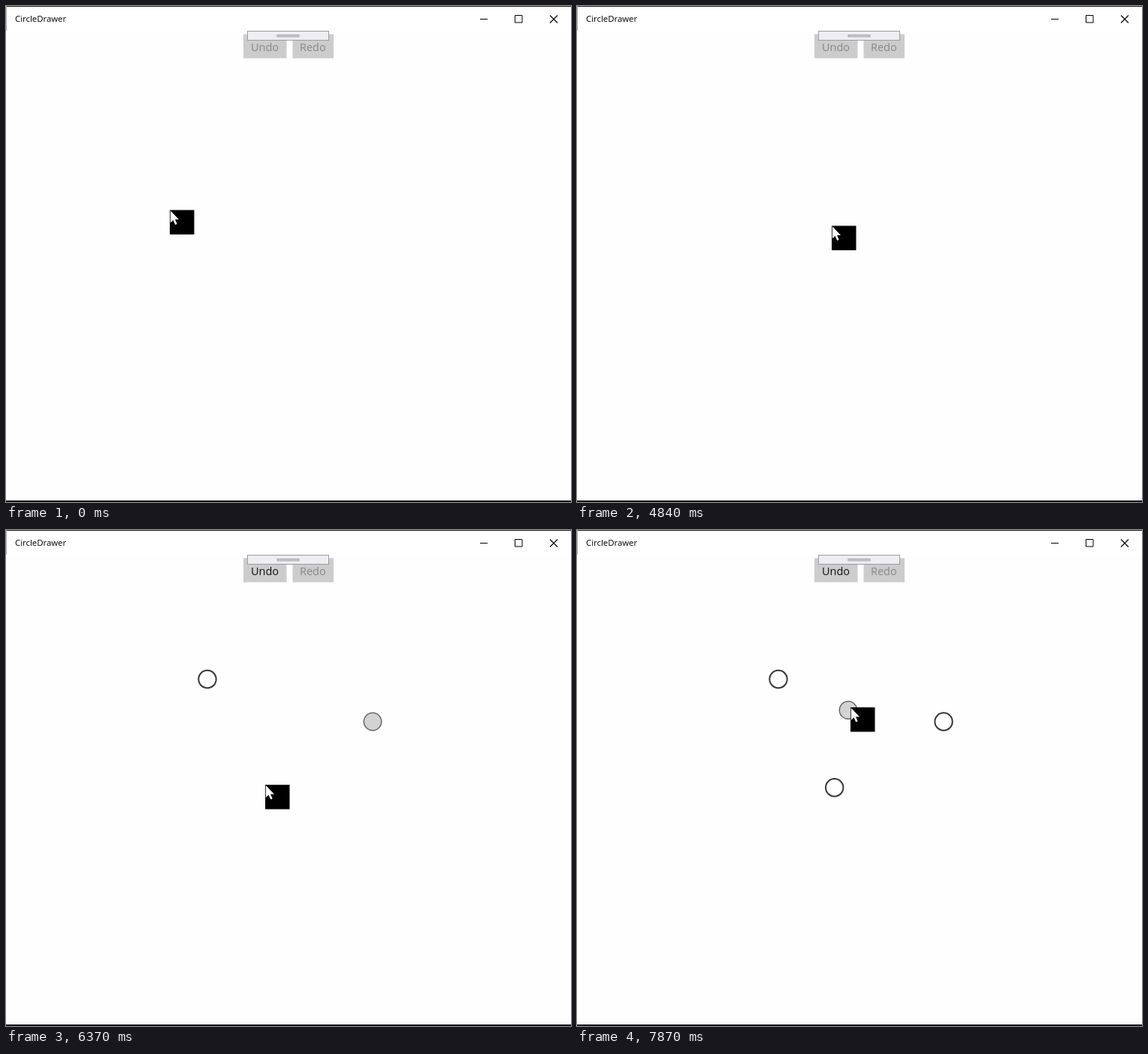
Animation, 752 px wide and 660 px high, one loop 8000 ms. Source, as an HTML page:

```html
<!DOCTYPE html>
<html lang="en">
<head>
<meta charset="utf-8">
<title>CircleDrawer</title>
<style>
  html, body { margin: 0; width: 100%; height: 100%; overflow: hidden; background: #fefefe; }
  svg { display: block; }
  text { font-family: "Open Sans", "Noto Sans", sans-serif; font-size: 14.5px; fill: #888; }
  #title { font-size: 11.4px; fill: #000; }
  #undo.on { fill: #111; }
  circle { fill: #fff; stroke: #383838; stroke-width: 2; }
  circle.active { fill: #d3d3d3; stroke: #666; stroke-width: 1.5; }
</style>
</head>
<body>
<svg width="752" height="660" viewBox="0 0 752 660">
  <rect width="752" height="33" fill="#fff"/>
  <rect width="752" height="1" fill="#1c1c1c"/>
  <rect width="1" height="33" fill="#aaa"/>
  <rect y="658" width="752" height="2"/>
  <text id="title" x="12" y="21">CircleDrawer</text>
  <g fill="none" stroke="#000">
    <path d="M631 17.5h10M677.5 12.5h9.5v9.5h-9.5z"/>
    <path d="M724 12.5l10 10M734 12.5l-10 10" stroke-width="1.1"/>
  </g>
  <path d="M316 37.5h57.5v32H316zM381.5 37.5H436v32h-54.5z" fill="#ccc"/>
  <text id="undo" x="326" y="60">Undo</text>
  <text x="391" y="60">Redo</text>
  <rect x="321.5" y="33.5" width="108" height="12" fill="#eeeef2" stroke="#999ca3"/>
  <rect x="361" y="38.5" width="29" height="2.5" fill="#ccced4" stroke="#a4a6ab"/>
  <g id="circles"></g>
  <g id="cursor">
    <rect width="32.5" height="32.5"/>
    <path d="M.8 .8v16.2l3.7-3.5 2.7 6 2.5-1.1-2.7-5.8h5z" fill="#fff"/>
  </g>
</svg>
<script>
const LOOP = 8000, STEP = 100 / 3;
const HIDE = 3770, SHOW = 4600;

// [time, x, y] of the pointer
const path = [
  [0, 218, 271.5], [HIDE, 218, 271.5],
  [SHOW, 552, 456], [4700, 458, 358], [4840, 339, 292.5], [4940, 289, 233], [5040, 267, 198],
  [5540, 267, 198], [5610, 298, 210], [5700, 396, 236], [5810, 488, 255],
  [6170, 488, 255], [6270, 429, 286], [6370, 345, 339], [6440, 343, 343],
  [6640, 343, 343], [6740, 352, 288], [6840, 361, 240],
  [7380, 361, 240], [7470, 361, 168.5], [7540, 358, 148], [7640, 360, 153],
  [7740, 365, 180], [7870, 364, 236], [LOOP, 364, 236]
];

// [time of creation, cx, cy]
const dots = [[5240, 268, 198.5], [6070, 488, 255], [6610, 342.7, 342.7], [7110, 361, 239.7]];

const get = id => document.getElementById(id);
const circles = dots.map(([, cx, cy]) => {
  const c = document.createElementNS("http://www.w3.org/2000/svg", "circle");
  c.setAttribute("cx", cx);
  c.setAttribute("cy", cy);
  c.setAttribute("r", 11.7);
  return get("circles").appendChild(c);
});

function pointerAt(t) {
  const i = Math.max(1, path.findIndex(p => p[0] > t));
  const [t0, x0, y0] = path[i - 1], [t1, x1, y1] = path[i];
  const held = Math.floor((t - t0) / STEP + 0.15) * STEP;
  const k = Math.min(1, held / (t1 - t0));
  return [x0 + (x1 - x0) * k, y0 + (y1 - y0) * k];
}

function draw(t) {
  const [x, y] = pointerAt(t);
  get("cursor").setAttribute("transform", `translate(${x} ${y})`);
  get("cursor").style.display = t >= HIDE && t < SHOW ? "none" : "";
  const count = dots.filter(d => d[0] <= t).length;
  circles.forEach((c, i) => {
    c.style.display = i < count ? "" : "none";
    c.classList.toggle("active", i === count - 1);
  });
  get("undo").classList.toggle("on", count > 0);
}

const start = performance.now();
function frame() {
  draw((performance.now() - start) % LOOP);
  requestAnimationFrame(frame);
}
frame();
</script>
</body>
</html>
```
